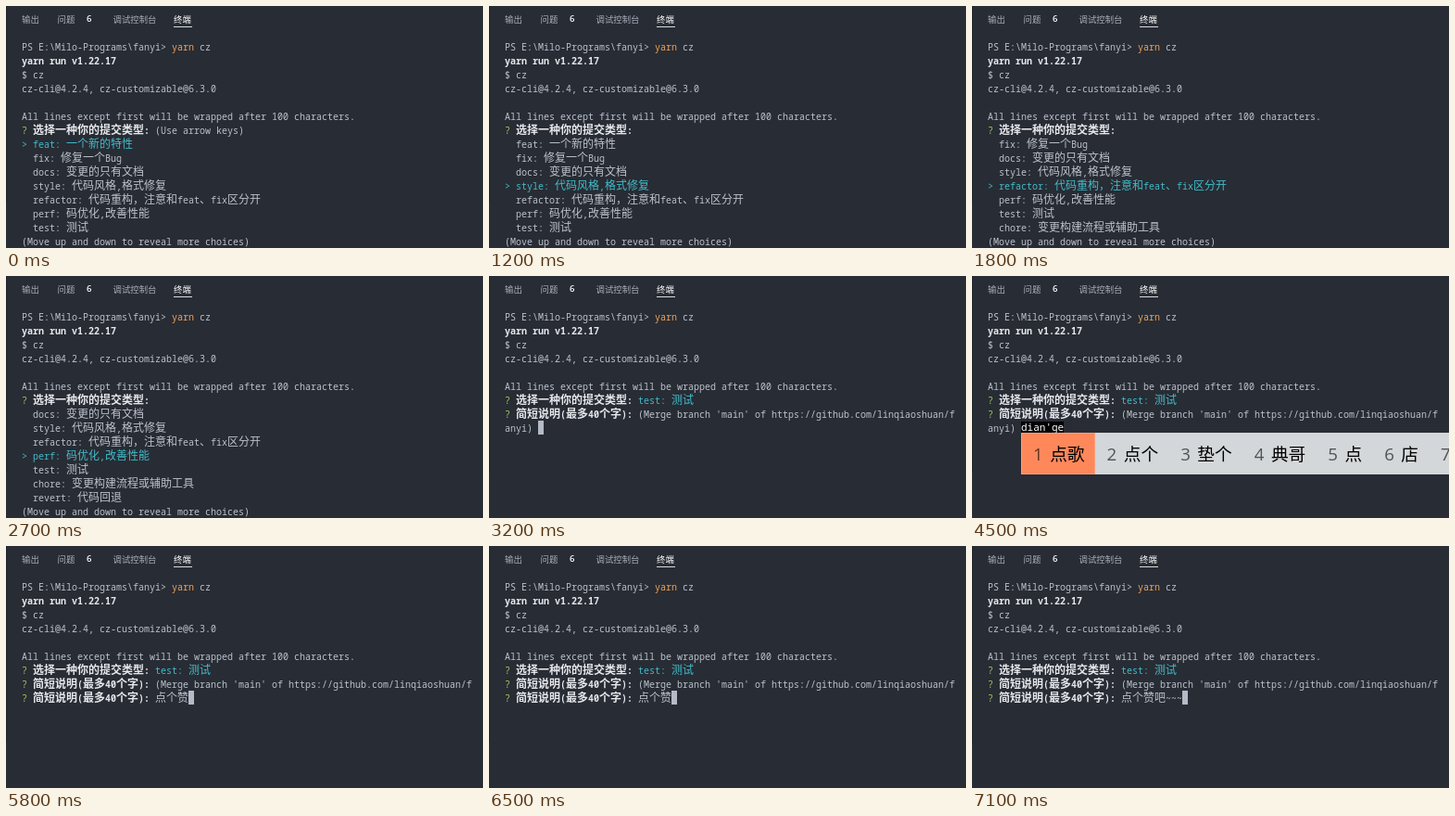
An HTML page that plays this animation: 515 px wide and 261 px high, repeating every 8.2 s.

```html
<!DOCTYPE html>
<html lang="zh-CN">
<head>
<meta charset="utf-8">
<title>Commit prompt</title>
<style>
  html, body { margin: 0; width: 100%; height: 100%; overflow: hidden; background: #282c34; }
  #stage { position: relative; width: 515px; height: 261px; overflow: hidden; background: #282c34; color: #bcc2cc;
    font: 10px/16px "Noto Sans Mono", "DejaVu Sans Mono", monospace; }
  .edge { position: absolute; left: 0; top: 0; width: 1px; height: 212px; background: #20242b; }
  .tab { position: absolute; top: 6px; white-space: nowrap; color: #a9afba;
    font: 9.4px/16px "Noto Sans CJK SC", "Noto Sans CJK", sans-serif; }
  .tab.on { color: #fff; }
  .badge { position: absolute; left: 87px; top: 6px; color: #fff; font: 600 9.5px/16px "Open Sans", sans-serif; }
  .line { position: absolute; left: 181px; top: 22px; width: 20px; height: 1px; background: #d7dae0; }
  .row { position: absolute; left: 17px; height: 15px; white-space: pre; }
  .zh { font: 12px/0 "Noto Sans CJK SC", "Noto Sans CJK", sans-serif; font-weight: inherit; }
  .bold { font-weight: 700; color: #e6e8ec; }
  .cmd { color: #f0a45d; }
  .ok { color: #9ccc58; }
  .pick { color: #42bcca; }
  .caret { display: inline-block; width: 6px; height: 15px; vertical-align: top; background: #b4bac6; }
  #typed { position: absolute; top: 157px; height: 12px; background: #000; color: #fff;
    font-size: 11px; font-weight: 500; line-height: 12px; white-space: pre; }
  #bar { position: absolute; top: 169px; right: 0; height: 45px; overflow: hidden; display: flex;
    background: #d4d7da; color: #000; }
  .word { flex: none; box-sizing: border-box; height: 45px; padding: 0 11px 0 13px; white-space: nowrap;
    font: 18.7px/44px "Noto Sans CJK SC", "Noto Sans CJK", sans-serif; }
  .word:first-child { background: #ff885b; box-shadow: inset 0 0 0 1px #ffa27e; }
  .word i { display: inline-block; width: 18.2px; font: 18.7px/20px "Open Sans", sans-serif; color: rgba(0, 0, 0, .62); }
</style>
</head>
<body>
<div id="stage">
  <div class="edge"></div>
  <div class="tab" style="left:17px">输出</div>
  <div class="tab" style="left:55.5px">问题</div>
  <div class="badge">6</div>
  <div class="tab" style="left:115.5px">调试控制台</div>
  <div class="tab on" style="left:181px">终端</div>
  <div class="line"></div>
  <div id="rows"></div>
  <div id="typed"></div>
  <div id="bar"></div>
</div>
<script>
const LOOP = 8200;
const $ = id => document.getElementById(id);
const zh = s => s.replace(/[\u3001-\u9fff\uff0c]+/g, m => `<span class="zh">${m}</span>`);
const tag = (cls, s) => `<span class="${cls}">${zh(s)}</span>`;
const caret = '<span class="caret"></span>';

const header = [
  'PS E:\\Milo-Programs\\fanyi&gt; ' + tag('cmd', 'yarn') + ' cz',
  tag('bold', 'yarn run v1.22.17'),
  '$ cz',
  'cz-cli@4.2.4, cz-customizable@6.3.0',
  '',
  'All lines except first will be wrapped after 100 characters.'
];

const types = [
  'feat: 一个新的特性',
  'fix: 修复一个Bug',
  'docs: 变更的只有文档',
  'style: 代码风格,格式修复',
  'refactor: 代码重构，注意和feat、fix区分开',
  'perf: 码优化,改善性能',
  'test: 测试',
  'chore: 变更构建流程或辅助工具',
  'revert: 代码回退',
  'init: 项目初始化'
];

const ask = s => tag('ok', '?') + ' ' + tag('bold', s) + ' ';
const askType = ask('选择一种你的提交类型:');
const askNote = ask('简短说明(最多40个字):');

// The list scrolls once the pointer has reached its fourth row.
function menu(sel, hint = '') {
  const first = Math.max(0, sel - 3);
  const list = types.slice(first, first + 7).map((s, i) =>
    first + i === sel ? tag('pick', '&gt; ' + s) : '  ' + zh(s));
  return { rows: [askType + hint, ...list, '(Move up and down to reveal more choices)'] };
}

// Without text the wrapped default answer is still on screen.
function note(text, typed = '', words = '') {
  const last = text === null ? 'anyi) ' : askNote + zh(text);
  const x = text === null ? 53 : 161 + 12 * text.length;
  return {
    rows: [
      askType + tag('pick', types[6]),
      askNote + "(Merge branch 'main' of https://github.com/linqiaoshuan/f",
      last + (typed ? '' : caret)
    ],
    typed, x, words
  };
}

const steps = [
  [0, menu(0, '(Use arrow keys)')],
  [900, menu(1)],
  [1000, menu(2)],
  [1200, menu(3)],
  [1700, menu(4)],
  [2700, menu(5)],
  [2900, menu(6)],
  [3200, note(null)],
  [4000, note(null, 'd', '的 都 大 到 对 等 得 多')],
  [4100, note(null, 'di', '第 地 低 底 弟 滴 敌 递')],
  [4200, note(null, 'dia', '点 店 电 嗲 掉 调 典 叠')],
  [4400, note(null, 'dian', '点 店 电 典 垫 殿 淀 颠')],
  [4500, note(null, "dian'ge", '点歌 点个 垫个 典哥 点 店 电')],
  [5000, note(null, "dian'ge'z", '点个赞 点个 点歌 垫个 点 店 电')],
  [5100, note(null, "dian'ge'za", '点个赞 点个 点歌 垫个 点 店 电')],
  [5200, note(null, "dian'ge'zan", '点个赞 点歌 点个 垫个 点 店 电')],
  [5800, note('点个赞')],
  [5900, note('点个赞', 'b', '不 吧 把 被 比 别')],
  [6000, note('点个赞', 'ba', '吧 把 八 爸 罢 巴')],
  [6500, note('点个赞')],
  [6600, note('点个赞吧')],
  [6800, note('点个赞吧~')],
  [6900, note('点个赞吧~~')],
  [7100, note('点个赞吧~~~')]
];

function draw({ rows, typed, x, words }) {
  $('rows').innerHTML = [...header, ...rows].map((s, i) =>
    `<div class="row" style="top:${36 + 15 * i}px">${s}</div>`).join('');
  for (const id of ['typed', 'bar']) {
    $(id).style.display = typed ? '' : 'none';
    $(id).style.left = x + 'px';
  }
  if (!typed) return;
  $('typed').textContent = typed;
  $('bar').innerHTML = words.split(' ').map((w, i) =>
    `<div class="word"><i>${i + 1}</i>${w}</div>`).join('');
}

let shown = null;
function tick(now) {
  const t = now % LOOP;
  const step = steps.findLast(s => s[0] <= t);
  if (step !== shown) draw((shown = step)[1]);
  requestAnimationFrame(tick);
}
tick(0);
</script>
</body>
</html>
```
